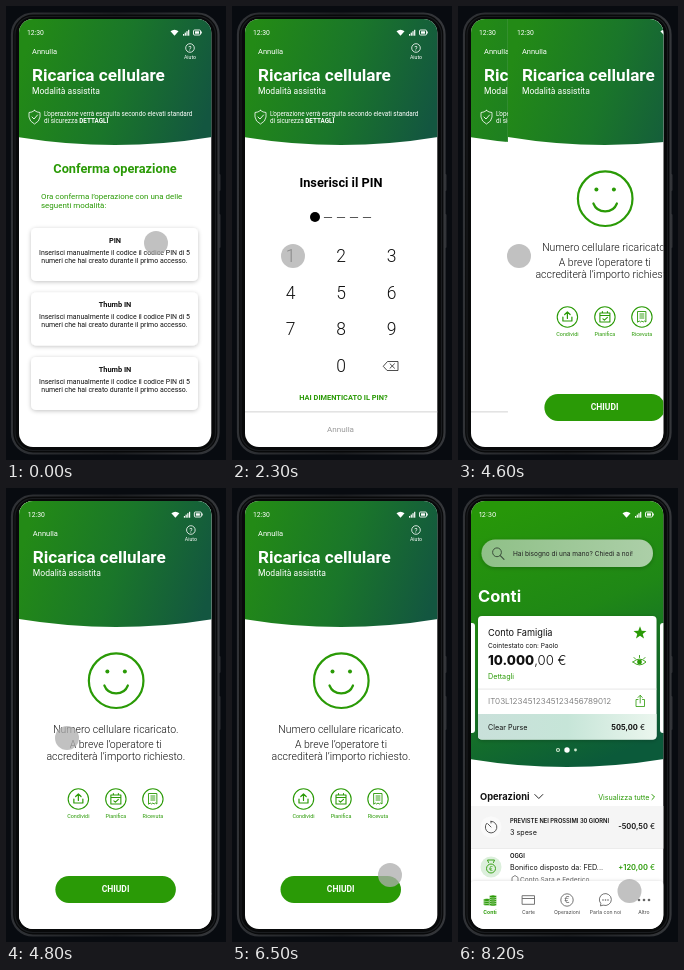
An HTML page for the animation above (8300 ms loop, 220 px wide and 454 px high).

```html
<!DOCTYPE html>
<html lang="it">
<head>
<meta charset="utf-8">
<title>Ricarica cellulare</title>
<style>
html, body { margin: 0; width: 100%; height: 100%; overflow: hidden; background: #080b10; }
svg { display: block; width: 100%; height: 100%; }
text { font-family: Roboto, "Noto Sans", sans-serif; white-space: pre; }
.inter text { font-family: Inter, "Noto Sans", sans-serif; }
</style>
</head>
<body>
<svg id="stage" viewBox="0 0 220 454" xmlns="http://www.w3.org/2000/svg"></svg>
<script>
const LOOP = 8300;
const GREEN = '#2a9a06';
const INK = '#111';

const text = (x, y, size, str, o = {}) =>
  `<text x="${x}" y="${y}" font-size="${size}" font-weight="${o.w || 400}" fill="${o.c || INK}" text-anchor="${o.a || 'start'}">${str}</text>`;
const mid = (x, y, size, str, o = {}) => text(x, y, size, str, { ...o, a: 'middle' });
const end = (x, y, size, str, o = {}) => text(x, y, size, str, { ...o, a: 'end' });
const rect = (x, y, w, h, fill, r = 0, extra = '') =>
  `<rect x="${x}" y="${y}" width="${w}" height="${h}" rx="${r}" fill="${fill}" ${extra}/>`;
const dot = (x, y, r, fill) => `<circle cx="${x}" cy="${y}" r="${r}" fill="${fill}"/>`;
const ring = (x, y, r, c, w = 1) =>
  `<circle cx="${x}" cy="${y}" r="${r}" fill="none" stroke="${c}" stroke-width="${w}"/>`;
const line = (d, c, w = 1) =>
  `<path d="${d}" fill="none" stroke="${c}" stroke-width="${w}" stroke-linecap="round" stroke-linejoin="round"/>`;
const shape = (d, fill) => `<path d="${d}" fill="${fill}"/>`;
const at = (x, y, body) => `<g transform="translate(${x} ${y})">${body}</g>`;
const page = (id, body, cls = '') =>
  `<g id="${id}" class="${cls}">${rect(12, 12, 194, 430, '#fff')}${body}</g>`;

const statusBar = () =>
  text(21, 29, 6.8, '12:30', { c: '#fff' }) +
  shape('M164.500 25.300 Q168.500 22 172.500 25.300 L168.500 29.800Z', '#fff') +
  [0, 1, 2, 3].map(i => rect(177 + i * 1.7, 28 - i * 1.4, 1.2, 1.7 + i * 1.4, '#fff')).join('') +
  rect(187.500, 24, 7, 5, 'none', 1, 'stroke="#fff" stroke-width=".9"') +
  rect(189, 25.300, 4, 2.400, '#fff') + rect(195, 25.500, .8, 2, '#fff');

const header = secure =>
  shape('M12 12H206V131Q109 147 12 131Z', 'url(#head)') + statusBar() +
  text(26, 48, 7.5, 'Annulla', { c: '#fff' }) +
  ring(184, 42, 4.3, '#fff', .8) + mid(184, 44.600, 7, '?', { c: '#fff' }) +
  mid(184, 53, 5.2, 'Aiuto', { c: '#fff' }) +
  text(26, 75, 17.15, 'Ricarica cellulare', { c: '#fff', w: 700 }) +
  text(26, 87.500, 8.57, 'Modalità assistita', { c: '#fff' }) +
  (secure ?
    line('M28.500 104.500 Q31 106.500 34 106.500 V111 Q33.500 115.500 28.500 118 Q23.500 115.500 23 111 V106.500 Q26 106.500 28.500 104.500Z', '#fff', .8) +
    line('M26 111 L28 113 L31.500 109', '#fff', .9) +
    text(38, 109.500, 6.36, 'L’operazione verrà eseguita secondo elevati standard', { c: '#fff' }) +
    text(38, 117.300, 6.36, 'di sicurezza <tspan font-weight="700">DETTAGLI</tspan>', { c: '#fff' }) : '');

const choice = (y, name) =>
  rect(25, y, 167, 53, '#fff', 5, 'filter="url(#soft)"') +
  mid(109, y + 14.500, 7.4, name, { w: 700 }) +
  mid(108.500, y + 26.600, 6.96, 'Inserisci manualmente il codice il codice PIN di 5') +
  mid(108.500, y + 34.600, 6.96, 'numeri che hai creato durante il primo accesso.');

const confirmPage = () => page('confirm',
  header(true) +
  mid(109, 167, 12.75, 'Conferma operazione', { c: GREEN, w: 700 }) +
  text(35, 192.500, 7.96, 'Ora conferma l’operazione con una delle', { c: GREEN }) +
  text(35, 202.300, 7.96, 'seguenti modalità:', { c: GREEN }) +
  choice(222, 'PIN') + choice(286.500, 'Thumb IN') + choice(351, 'Thumb IN'));

const slotX = i => 83 + i * 13;
const pinPage = () => {
  const keys = [1, 2, 3, 4, 5, 6, 7, 8, 9].map((n, i) =>
    mid(58.500 + (i % 3) * 50.500, 256 + Math.floor(i / 3) * 36.700, 17.5, n, { w: 300 })).join('');
  const slots = [0, 1, 2, 3, 4].map(i =>
    `<g class="dash">${line(`M${slotX(i) - 3.7} 211.500H${slotX(i) + 3.7}`, '#444', .9)}</g>` +
    `<g class="digit">${dot(slotX(i), 211, 5, '#000')}</g>`).join('');
  return page('pin',
    header(true) +
    mid(109, 180.500, 12.75, 'Inserisci il PIN', { w: 700, c: '#000' }) + slots + keys +
    mid(109, 366, 17.5, '0', { w: 300 }) +
    line('M151.500 360 L155.500 355.500 H166 V364.500 H155.500Z M158 357.800 L162.500 362.200 M162.500 357.800 L158 362.200', '#222', .8) +
    mid(111.500, 394, 7.4, 'HAI DIMENTICATO IL PIN?', { c: GREEN, w: 700 }) +
    rect(12, 405.500, 194, .8, '#c8c8c8') +
    mid(108.500, 426, 8.1, 'Annulla', { c: '#999' }));
};

const action = (x, label, icon) =>
  ring(x, 311, 10.2, GREEN, 1.1) + at(x, 311, icon) + mid(x, 330, 5.4, label, { c: GREEN });

const donePage = () => page('done',
  header(false) +
  ring(109.300, 192.700, 27.3, GREEN, 2.2) + dot(100.500, 183.500, 2, GREEN) + dot(118, 183.500, 2, GREEN) +
  line('M97.500 197.500 C101.500 208 117 208 121 197.500', GREEN, 2.2) +
  mid(109, 245, 10.45, 'Numero cellulare ricaricato.', { w: 300 }) +
  mid(109, 259.500, 10.45, 'A breve l’operatore ti', { w: 300 }) +
  mid(109, 272, 10.5, 'accrediterà l’importo richiesto.', { w: 300 }) +
  action(71.500, 'Condividi', line('M-4.500 0V4H4.500V0 M0 1.500V-5 M-2.700 -2.500 L0 -5 L2.700 -2.500', GREEN, 1.2)) +
  action(109, 'Pianifica', line('M-5 -4H5V5H-5Z M-5 -1.500H5 M-2.500 -5.500V-4 M2.500 -5.500V-4 M-2 1.800 L-.5 3.200 L2.500 .3', GREEN, 1.1)) +
  action(146, 'Ricevuta', line('M-4 -5.500H4V5L2.700 4L1.300 5L0 4L-1.300 5L-2.700 4L-4 5Z M-2 -3H2 M-2 -1H2 M-2 1H2', GREEN, .9)) +
  rect(48.500, 388, 120.500, 27, GREEN, 13.5) +
  mid(108.700, 404.300, 8.5, 'CHIUDI', { c: '#fff', w: 700 }));

const star = (x, y, r) => shape('M' + Array.from({ length: 10 }, (_, i) => {
  const a = (i / 5 - .5) * Math.PI, k = i % 2 ? r * .42 : r;
  return `${(x + k * Math.cos(a)).toFixed(2)} ${(y + k * Math.sin(a)).toFixed(2)}`;
}).join('L') + 'Z', GREEN);

const tab = (i, label, icon) => {
  const x = 32 + i * 38.500, on = i === 0;
  return at(x, 412, icon) + mid(x, 425.800, 5.1, label, { c: on ? GREEN : '#444', w: on ? 700 : 400 });
};

const homePage = () => {
  const grey = '#666';
  const account =
    rect(10, 135, 7, 110, '#fff', 3) + rect(202, 135, 8, 110, '#fff', 3) +
    rect(20, 128, 178.500, 123.500, '#fff', 4, 'filter="url(#soft)"') +
    shape('M20 226H198.500V247.500Q198.500 251.500 194.500 251.500H24Q20 251.500 20 247.500Z', 'url(#strip)') +
    text(30, 148.300, 9.2, 'Conto Famiglia') + star(182, 145, 6.8) +
    text(30, 160, 6.6, 'Cointestato con: Paolo') +
    text(30, 177, 13.2, '<tspan font-weight="800">10.000</tspan><tspan font-weight="300">,00 €</tspan>') +
    line('M175 174 Q181.500 168 188 174 Q181.500 180 175 174Z M176 169.500 L177.500 171 M181.500 167.500V169.500 M187 169.500 L185.500 171', GREEN, .9) +
    dot(181.500, 174, 2.4, GREEN) +
    text(30, 190.500, 7.2, 'Dettagli', { c: GREEN }) +
    rect(20, 200.700, 178.500, .7, '#ddd') +
    text(30, 216, 8.2, 'IT03L1234512345123456789012', { c: '#666', w: 300 }) +
    line('M180 211.500H178V218.500H186.500V211.500H184.500 M182.200 215V207.500 M180 209.500 L182.200 207.300 L184.400 209.500', GREEN, .8) +
    text(30, 242, 7.2, 'Clear Purse') +
    end(187, 242, 7.5, '<tspan font-weight="700">505,00</tspan> €') +
    ring(100, 262, 1.5, '#cfe8cf', 1.1) + dot(109, 262, 2.7, '#fff') + dot(117.500, 262, 1.4, '#cfe8cf');
  const list =
    text(22, 311.500, 9.3, 'Operazioni', { w: 700 }) + line('M76.800 306.500 L80.800 310.500 L84.800 306.500', INK, .9) +
    end(191.500, 311.500, 7.15, 'Visualizza tutte', { c: GREEN }) +
    line('M194 306.500 L196.500 309 L194 311.500', GREEN, 1) +
    rect(12, 318, 194, 42, '#f5f5f5') + rect(12, 360, 194, .7, '#e4e4e4') +
    dot(33, 339, 10.5, '#fafafa') +
    line('M33 333.300 A5.800 5.800 0 1 1 28.500 335.500 M33 339 L29.700 335.700 M33 333.300V335', '#444', .9) +
    text(52, 335, 5.8, 'PREVISTE NEI PROSSIMI 30 GIORNI', { w: 600 }) +
    text(52, 347, 7.2, '3 spese') +
    end(197, 341, 7.5, '<tspan font-weight="600">-500,50</tspan> €') +
    dot(33, 379, 10.5, '#dcefdc') + ring(33, 380.500, 4.5, GREEN, .9) +
    line('M30.500 374.500 L29.500 372 H36.500 L35.500 374.500', GREEN, .9) + mid(33, 382.800, 6, '€', { c: GREEN }) +
    text(52, 369.500, 5.8, 'OGGI', { w: 600 }) +
    text(52, 382, 7.2, 'Bonifico disposto da: FED...') +
    end(197, 382, 7.5, '<tspan font-weight="600">+120,00</tspan> €', { c: GREEN }) +
    line('M54 394 V389.500 L57 387.500 L60 389.500 V394', grey, .8) +
    text(62, 394, 6.6, 'Conto Sara e Federico', { c: grey });
  const coin = (x, y) =>
    `<ellipse cx="${x}" cy="${y}" rx="3.600" ry="1.500" fill="${GREEN}" stroke="#fff" stroke-width=".5"/>`;
  const coins = [4, 2, 0].map(y => coin(-3, y)).join('') + [4.5, 2.5, .5, -1.5, -3.5].map(y => coin(3, y)).join('');
  const tabs =
    rect(12, 393, 194, 52, '#fff', 5, 'filter="url(#soft)"') +
    tab(0, 'Conti', coins) +
    tab(1, 'Carte', line('M-6 -4.300H6V4.300H-6Z M-6 -1.500H6', grey, .9)) +
    tab(2, 'Operazioni', ring(0, 0, 6.2, grey, .9) + mid(0, 3, 8.3, '€', { c: grey })) +
    tab(3, 'Parla con noi', line('M-5 5.500 L-4.700 3.500 A6 6 0 1 1 -2 5.300Z', grey, .9) +
      [-2.5, 0, 2.5].map(x => dot(x, 0, .8, grey)).join('')) +
    tab(4, 'Altro', [-5, 0, 5].map(x => dot(x, 0, 1.3, grey)).join(''));
  return page('home',
    shape('M12 12H206V271Q109 287 12 271Z', 'url(#homeHead)') + statusBar() +
    rect(23.500, 51.500, 171.500, 27.500, 'url(#pill)', 13.7, 'filter="url(#soft)"') +
    ring(39, 64.300, 4.4, '#3d4f3d', 1) + line('M42.300 67.700 L46 71.300', '#3d4f3d', 1.1) +
    text(55, 67.500, 6.55, 'Hai bisogno di una mano? Chiedi a noi!', { c: '#222' }) +
    text(20, 114, 16.5, 'Conti', { c: '#fff', w: 700 }) + account + list + tabs, 'inter');
};

const gradient = (id, vec, stops) => `<linearGradient id="${id}" ${vec}>` +
  stops.map(([o, c]) => `<stop offset="${o}" stop-color="${c}"/>`).join('') + '</linearGradient>';

const stage = document.getElementById('stage');
stage.innerHTML = `<defs>
  ${gradient('head', 'x1="0" y1=".45" x2="1" y2=".65"', [[0, '#238a16'], [.5, '#1a762a'], [1, '#135640']])}
  ${gradient('homeHead', 'x1=".3" y1="0" x2=".6" y2="1"', [[0, '#279709'], [.45, '#1f8716'], [1, '#0b5a3a']])}
  ${gradient('strip', 'x1="0" y1="0" x2="1" y2="0"', [[0, '#c9e0da'], [.5, '#c6e5d8'], [1, '#ebf6ee']])}
  ${gradient('pill', 'x1="0" y1="0" x2="1" y2="0"', [[0, '#8fc087'], [1, '#accfa8']])}
  ${gradient('rim', 'x1="0" y1="0" x2="1" y2="0"', [[0, '#303236'], [.5, '#1b1d20'], [1, '#35373b']])}
  <filter id="soft" x="-20%" y="-30%" width="140%" height="160%"><feDropShadow dx="0" dy="1" stdDeviation="2" flood-color="#000" flood-opacity=".24"/></filter>
  <clipPath id="screen"><rect x="13" y="13" width="192.300" height="428" rx="14"/></clipPath>
</defs>` +
  rect(0, 0, 220, 454, '#080b10') +
  rect(212, 168, 2.500, 17, '#2c2e32', 1) + rect(212, 208, 2.500, 34, '#2c2e32', 1) +
  rect(6, 7.500, 206.500, 440, '#08090a', 21, 'stroke="url(#rim)" stroke-width="2.200"') +
  rect(9, 10.500, 200.500, 434, 'none', 18, 'stroke="#1a1c1f" stroke-width="1.200"') +
  `<g clip-path="url(#screen)">${confirmPage()}${pinPage()}${donePage()}${homePage()}</g>` +
  `<circle id="touch" r="12" fill="#aeaeae"/>`;

const pick = id => document.getElementById(id);
const [confirmEl, pinEl, doneEl, homeEl, touch] = ['confirm', 'pin', 'done', 'home', 'touch'].map(pick);
const dashes = [...stage.querySelectorAll('.dash')];
const digits = [...stage.querySelectorAll('.digit')];

const typed = [2100, 2600, 3000, 3500, 3700];
const presses = [...typed, 4100];
// time, x, y
const route = [
  [0, 150, 237], [500, 150, 237], [1300, 144, 268], [1900, 61, 250], [5200, 61, 250],
  [5300, 78, 274], [5400, 118, 329], [5600, 157, 379], [6200, 166, 388], [6500, 158, 387],
  [7100, 141, 403], [7200, 141, 403], [7300, 144.5, 403], [8200, 171.5, 403], [LOOP, 171.5, 403]
];

function touchAt(t) {
  const i = route.findIndex(p => p[0] > t);
  const [t0, x0, y0] = route[i - 1], [t1, x1, y1] = route[i];
  const u = (t - t0) / (t1 - t0), k = u * u * (3 - 2 * u);
  return [x0 + (x1 - x0) * k, y0 + (y1 - y0) * k];
}

const show = (el, on) => el.setAttribute('visibility', on ? 'visible' : 'hidden');

function draw(t) {
  const pinOn = t >= 500 && t < 4900;
  show(confirmEl, t < 500);
  show(pinEl, pinOn);
  show(doneEl, t > 4400 && t < 7300);
  show(homeEl, t >= 7300);
  typed.forEach((when, i) => {
    show(digits[i], pinOn && t >= when);
    show(dashes[i], pinOn && t < when);
  });
  const slide = Math.min(1, Math.max(0, (t - 4400) / 480));
  doneEl.setAttribute('transform', `translate(${193 * (1 - slide) ** 3} 0)`);
  const [x, y] = touchAt(t);
  touch.setAttribute('cx', x);
  touch.setAttribute('cy', y);
  touch.setAttribute('opacity', presses.some(p => t >= p && t < p + 200) ? .88 : .76);
}

const start = performance.now();
function tick() {
  draw((performance.now() - start) % LOOP);
  requestAnimationFrame(tick);
}
tick();
</script>
</body>
</html>
```
